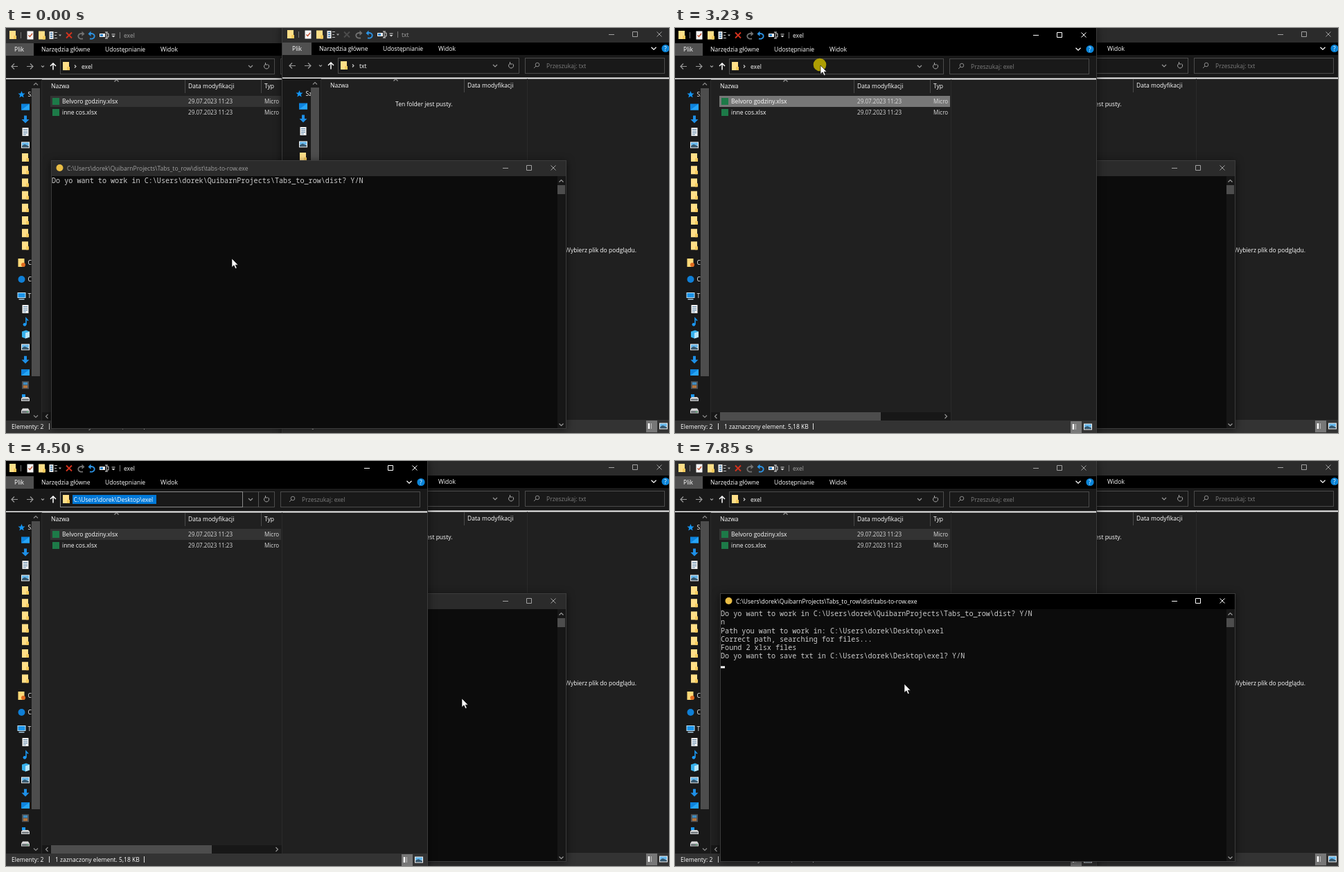
Write an HTML page that moves like this. It is 957x585 px and loops after 8 s.

```html
<!DOCTYPE html>
<html lang="pl">
<head>
<meta charset="utf-8">
<title>Konsola</title>
<style>
html, body { margin: 0; width: 100%; height: 100%; overflow: hidden; background: #202020; }
svg { display: block; width: 957px; height: 585px; }
text { font: 8.55px "Open Sans", "Noto Sans", sans-serif; fill: #fff; }
.win { --bar: #2b2b2b; --ink: #a2a2a2; }
.win.on { --bar: #000; --ink: #fff; }
.bar { fill: var(--bar); }
.ink { fill: var(--ink); }
.ctl { stroke: var(--ink); fill: none; }
.shade { filter: drop-shadow(0 2px 6px rgba(0, 0, 0, .55)); }
.num { font-size: 8.1px; fill: #dedede; }
.dim { fill: #7d7d7d; }
.mono { font: 10.13px "Noto Sans Mono", "DejaVu Sans Mono", monospace; fill: #ccc; white-space: pre; }
.row { fill: #333; }
.hot .row { fill: #777; }
.edit, .editing .crumb { display: none; }
.editing .edit { display: inline; }
</style>
</head>
<body>
<svg id="stage" viewBox="0 0 957 585"></svg>
<script>
const LOOP = 8000;
const HOME = String.raw`C:\Users\dorek`;
const PROJECT = HOME + String.raw`\QuibarnProjects\Tabs_to_row\dist`;
const FOLDER = HOME + String.raw`\Desktop\exel`;

// Markup helpers
const at = (x, y, s) => `<g transform="translate(${x} ${y})">${s}</g>`;
const rect = (x, y, w, h, fill, more = '') => `<rect x="${x}" y="${y}" width="${w}" height="${h}" fill="${fill}" ${more}/>`;
const text = (x, y, s, cls = '') => `<text x="${x}" y="${y}" class="${cls}">${s}</text>`;
const line = (d, color = '#ddd', w = 1) => `<path d="${d}" fill="none" stroke="${color}" stroke-width="${w}"/>`;
const shape = (d, fill) => `<path d="${d}" fill="${fill}"/>`;
const dot = (x, y, r, fill) => `<circle cx="${x}" cy="${y}" r="${r}" fill="${fill}"/>`;
const down = (x, y, color, s = 3) => line(`M${x - s} ${y - s / 2}l${s} ${s}l${s} ${-s}`, color, 1.2);
const up = (x, y, color, s = 3) => line(`M${x - s} ${y + s / 2}l${s} ${-s}l${s} ${s}`, color, 1.2);
const side = (x, y, dir, color, s = 3) => line(`M${x - dir * s / 2} ${y - s}l${dir * s} ${s}l${-dir * s} ${s}`, color, 1.1);

// Icons, drawn around their centre
const icon = {
  folder: rect(-5, -6, 9, 12, '#ffdf88') + shape('M1 6V1H5V6z', '#f7cb5c'),
  star: shape('M0-5L1.4-1.6L5-1.4L2.2 1L3.2 4.6L0 2.6L-3.2 4.6L-2.2 1L-5-1.4L-1.4-1.6Z', '#1496f5'),
  desktop: rect(-6, -4.5, 12, 9, '#0d83dd') + shape('M-6 4.5L6-4.5V4.5z', '#27a5f8'),
  arrow: shape('M-2-5.5h4V0H5.5L0 5.5L-5.5 0H-2z', '#1e8fe6'),
  doc: rect(-4.5, -6, 9, 12, '#f1f1f1') + line('M-3-3.5H3M-3-1H3M-3 1.5H3M-3 4H1', '#5b85a8'),
  photo: rect(-6, -4.5, 12, 9, '#f3f3f3') + rect(-5, -3.5, 10, 4, '#65b7ec') + shape('M-5 3.5V1L-1-1L5 1.5V3.5z', '#34566d'),
  badge: rect(-5, -6, 9, 12, '#ffd978') + dot(2.5, 3, 3, '#e06a20'),
  cloud: dot(0, 0, 5, '#0f7fd6'),
  pc: rect(-6, -5, 12, 8, '#bfe4fb') + rect(-5, -4, 10, 6, '#1b92e8') + rect(-4, 4, 8, 1.5, '#a9c8dc'),
  music: line('M1 4V-5L4-1.5', '#1c98f2', 1.6) + dot(-1, 4, 2.4, '#1c98f2'),
  cube: shape('M-5-4L1-6L6-4V4L0 6L-5 4z', '#36b1ec') + shape('M0-2L6-4V4L0 6z', '#b9e6fa'),
  film: rect(-5, -5.5, 10, 11, '#505458') + rect(-3, -4, 6, 3.5, '#3f8cc0') + rect(-3, .5, 6, 3.5, '#b9763a'),
  drive: shape('M-4-3H4L6 0V4H-6V0z', '#d9d9d9') + rect(-5, .5, 10, 3, '#70777c') + rect(2, 1.5, 2, 1, '#5fe07a'),
  disk: shape('M-4-1H4L6 1V5H-6V1z', '#d9d9d9') + rect(-5, 1.5, 10, 2.5, '#70777c') + rect(-5, -5, 5, 4, '#1c98f2'),
  check: rect(-4.5, -6, 9, 12, '#f5f5f5') + line('M-2.5 0L-.5 2L3-2.5', '#c6502c', 1.3),
  panel: rect(-5.5, -5.5, 6, 11, '#eee') + line('M-4-3H-1M-4 0H-1M-4 3H-1', '#3b78ad', 1.3) + line('M2-4H6M2 0H5M2 4H6', '#bbb'),
  rename: rect(-6, -2.5, 8, 5, '#f2f2f2') + rect(-5, -1.5, 4, 3, '#2f86cd') + line('M2-4.5H6M4-4.5V4.5M2 4.5H6M5-2.5H7V2.5H5'),
  turn: line('M-3 4.5C5 6 6-3-1-3H-3', 'currentColor', 1.9) + shape('M-1.5-6.5V1L-5.5-2.5z', 'currentColor')
};
const put = (name, x, y) => at(x, y, icon[name]);
const turn = (x, y, color, flip) => `<g transform="translate(${x} ${y}) scale(${flip} 1)" color="${color}">${icon.turn}</g>`;

const controls = (xs, y) => `<path class="ctl" d="M${xs[0] - 4} ${y + .5}h8M${xs[1] - 3.5} ${y - 3.5}h7v7h-7zM${xs[2] - 3.5} ${y - 3.5}l7 7m0-7l-7 7"/>`;

// x is where the scrollbar starts
function sidebar(x) {
  const small = [['desktop', 114], ['arrow', 132], ['doc', 150], ['photo', 169]];
  for (let i = 0; i < 8; i++) small.push(['folder', 187 + i * 18.2]);
  ['doc', 'music', 'cube', 'photo', 'arrow', 'desktop', 'film', 'disk', 'drive', 'drive']
    .forEach((n, i) => small.push([n, 406 + i * 18.3]));
  const heads = [['star', 96, 'Sz'], ['badge', 339, 'C'], ['cloud', 363, 'C'], ['pc', 387, 'T']];
  return rect(-2, 74, x + 16, 493, '#191919')
    + small.map(([n, y]) => put(n, 28, y)).join('')
    + heads.map(([n, y, s]) => put(n, 22.5, y) + text(31.5, y + 3, s)).join('')
    + rect(x, 74, 14, 493, '#191919') + rect(x, 87, 12, 416, '#4d4d4d')
    + up(x + 6, 81, '#8a8a8a') + down(x + 6, 561, '#8a8a8a') + rect(x + 14, 74, 1, 493, '#2b2b2b');
}

// Explorer window in local coordinates; r is its right edge
function explorer({ id, x, y, r, nav, name, count, canDelete, list }) {
  const end = r - 220;
  return `<g id="${id}" class="win" transform="translate(${x} ${y})">`
    + rect(-2.5, -3, r + 3, 600, '#202020', 'class="shade" stroke="#3c3c3c"')
    + `<rect class="bar" x="-2" y="-2" width="${r + 2}" height="24"/>`
    + put('folder', 10, 10) + rect(21, 6, 1, 9, '#777') + put('check', 35, 10.5) + put('folder', 52, 10.5)
    + put('panel', 68, 10.5) + shape('M76 9.5h4l-2 2.5z', '#aaa')
    + line('M87 6.5l8 8m0-8l-8 8', canDelete ? '#d3321d' : '#4c4c4c', 1.9)
    + turn(108, 11, '#727272', -1) + turn(124, 11, '#2c94e6', 1) + put('rename', 141, 10.5)
    + line('M152.5 9h5') + shape('M152.5 11h5l-2.5 2.5z', '#ddd') + rect(164, 6, 1, 9, '#777')
    + text(170, 13.5, name, 'ink') + controls([r - 87, r - 53, r - 18], 10)
    + rect(-2, 22, r + 2, 18, '#000') + rect(-2, 22, 42, 18, '#505050')
    + [[12, 'Plik'], [51, 'Narzędzia główne'], [143, 'Udostępnianie'], [223, 'Widok']].map(([tx, s]) => text(tx, 34, s)).join('')
    + down(r - 26, 30.5, '#fff', 3.5) + dot(r - 9, 30.5, 5.6, '#0a84d8') + text(r - 11, 33.6, '?')
    + rect(-2, 40, r + 2, 33, '#191919')
    + line('M17 55.5H8M12 51.5l-4 4l4 4', '#9a9a9a', 1.2) + line('M30 55.5h9M35 51.5l4 4l-4 4', '#9a9a9a', 1.2)
    + down(53, 55.5, '#999', 2) + line('M68 60.5V51M64 55l4-4l4 4', '#fff', 1.5)
    + rect(78.5, 44.5, end - 79, 22, '#191919', 'stroke="#4b4b4b"')
    + put('folder', 87, 55)
    + `<g class="crumb">${side(100, 55.5, 1, '#ccc', 2)}${text(109, 58.5, name)}</g>`
    + `<g class="edit">${rect(78.5, 44.5, 263, 22, 'none', 'stroke="#8a8a8a"')}${rect(364, 44, 1, 23, '#555')}${rect(96, 49, 121, 13, '#0078d7')}${text(97.5, 58.6, FOLDER)}</g>`
    + down(end - 35, 55.5, '#999') + line(`M${end - 10} 52.5a3.5 3.5 0 1 1-3.5-.2M${end - 13.5} 50v3h3`, '#aaa')
    + rect(r - 211.5, 44.5, 201, 22, '#191919', 'stroke="#4b4b4b"')
    + `<circle cx="${r - 194}" cy="54" r="2.8" fill="none" stroke="#8a8a8a"/>` + line(`M${r - 196} 56l-3 3`, '#8a8a8a')
    + text(r - 181, 58.5, 'Przeszukaj: ' + name, 'dim')
    + rect(-2, 72.5, r + 2, 2, '#f2f2f2')
    + sidebar(nav) + list
    + rect(-2, 567, r + 2, 30, '#333') + text(8, 579.3, 'Elementy: ' + count)
    + rect(62, 571, 1, 9, '#ddd')
    + (count ? text(71, 579.3, '1 zaznaczony element. 5,18 KB') + rect(199, 571, 1, 9, '#ddd') : '')
    + rect(r - 37, 568, 16, 17, '#777') + line(`M${r - 33} 572v8`, '#fff', 2.5) + line(`M${r - 29.5} 572v8`, '#bbb')
    + put('photo', r - 12, 576) + '</g>';
}

const column = (x, s) => rect(x, 75, 1, 19, '#4a4a4a') + text(x + 5, 87.3, s);
const sheet = (y, name) => rect(67, y - 5, 10, 10, '#1d7a48') + text(81, y + 3, name)
  + text(263, y + 3, '29.07.2023 11:23', 'num') + text(373, y + 3, 'Micro', 'num');

const files = text(65, 87.3, 'Nazwa') + up(159.5, 76, '#999')
  + column(258, 'Data modyfikacji') + column(368, 'Typ')
  + '<rect class="row" x="64" y="98" width="333" height="16"/>'
  + sheet(106, 'Belvoro godziny.xlsx') + sheet(122, 'inne cos.xlsx')
  + rect(398, 74, 1, 493, '#2b2b2b')
  + rect(52, 555, 346, 12, '#171717') + rect(65, 555, 232, 12, '#4d4d4d')
  + side(59, 561, -1, '#999') + side(391, 561, 1, '#999');

const empty = text(67, 87.3, 'Nazwa') + up(161.5, 76, '#999') + column(260, 'Data modyfikacji')
  + text(161, 114, 'Ten folder jest pusty.') + rect(351, 74, 1, 493, '#2b2b2b')
  + '<text x="509" y="324.5" text-anchor="end">Wybierz plik do podglądu.</text>';

// Console geometry
const CELL = 6.08, PITCH = 12.16, LEFT = 66;
const prompt = 'Path you want to work in: ';
const output = [
  [0, 0, `Do yo want to work in ${PROJECT}? Y/N`],
  [1700, 1, 'n'],
  [1880, 2, prompt],
  [6100, 2, prompt + FOLDER],
  [7290, 3, 'Correct path, searching for files...'],
  [7330, 4, 'Found 2 xlsx files'],
  [7330, 5, `Do yo want to save txt in ${FOLDER}? Y/N`]
];
// time, column, row; a missing column hides the caret
const caretSteps = [
  [0], [130, 0, 1], [620], [1140, 0, 1], [1700, 1, 1], [1880, 26, 2], [2400],
  [4640, 26, 2], [5580], [6100, 53, 2], [6620], [7140, 53, 2], [7290, 0, 6]
];
const path = [
  [0, 326, 333], [850, 326, 333], [960, 357, 328], [2360, 357, 328], [2560, 190, 200],
  [2720, 52, 95], [2900, 130, 41], [3100, 210, 54], [3860, 210, 54], [4430, 671, 348],
  [4600, 641, 336], [4700, 641, 336], [5220, 153, 290], [5430, 150, 288], [5530, 150, 288],
  [5850, 300, 345], [6310, 322, 315], [6370, 322, 315], [6450, 324, 317], [7530, 324, 317],
  [7570, 331, 322], [LOOP, 331, 322]
];
const clicks = [[70, 130], [3230, 3300], [4600, 4670]];

const terminal = '<g id="console" class="win">'
  + rect(65.5, 191.5, 743, 387, '#0c0c0c', 'class="shade" stroke="#3c3c3c"')
  + '<rect class="bar" x="66" y="192" width="742" height="22"/>'
  + dot(77.5, 202, 5, '#e9bd45')
  + text(88, 205.5, PROJECT + '\\tabs-to-row.exe', 'ink')
  + controls([721, 755, 790], 202)
  + rect(796, 214, 12, 364, '#171717') + rect(796, 227, 11, 13, '#4d4d4d')
  + up(801.5, 221, '#999') + down(801.5, 573, '#999')
  + [0, 1, 2, 3, 4, 5].map(i => text(LEFT, 224.2 + i * PITCH, '', 'mono line')).join('')
  + '<rect id="caret" width="6" height="3" fill="#f2f2f2"/></g>';

const stage = document.getElementById('stage');
stage.innerHTML = '<g id="desk">'
  + explorer({ id: 'left', x: 0, y: 0, r: 608, nav: 37, name: 'exel', count: 2, canDelete: true, list: files })
  + explorer({ id: 'right', x: 401, y: -1, r: 560, nav: 39, name: 'txt', count: 0, canDelete: false, list: empty })
  + terminal + '</g>'
  + '<g id="pointer"><circle id="halo" cx="-1" cy="-1" r="9.3" fill="#c2b000" opacity=".88"/>'
  + '<path d="M0 0V12.5L3 9.8L5.2 14.6L7.2 13.7L5.2 9.2H9Z" fill="#fff" stroke="#000" stroke-width=".6"/></g>';

const $ = id => document.getElementById(id);
const [desk, left, right, shell, caret, pointer, halo] = ['desk', 'left', 'right', 'console', 'caret', 'pointer', 'halo'].map($);
const rows = [...document.querySelectorAll('.line')];
let order = '';

function stack(key, wins) {
  if (key === order) return;
  order = key;
  desk.append(...wins);
}

function position(t) {
  const i = path.findIndex(p => p[0] > t);
  const [t0, x0, y0] = path[i - 1], [t1, x1, y1] = path[i];
  const k = (t - t0) / (t1 - t0);
  return [x0 + (x1 - x0) * k, y0 + (y1 - y0) * k].map(Math.round);
}

function render(t) {
  const leftOn = t >= 3230 && t < 4600;
  if (t < 3230) stack('start', [left, right, shell]);
  else if (leftOn) stack('left', [right, shell, left]);
  else stack('console', [right, left, shell]);

  left.classList.toggle('on', leftOn);
  left.classList.toggle('hot', leftOn && t < 3300);
  left.classList.toggle('editing', leftOn && t >= 3300);
  shell.classList.toggle('on', t >= 70 && !leftOn);

  rows.forEach((row, i) => {
    const shown = output.filter(o => o[1] === i && o[0] <= t).pop();
    row.textContent = shown ? shown[2] : '';
  });

  const [, col, line] = caretSteps.filter(c => c[0] <= t).pop();
  caret.style.display = col === undefined ? 'none' : '';
  if (col !== undefined) {
    caret.setAttribute('x', LEFT + col * CELL);
    caret.setAttribute('y', 235.5 + (line - 1) * PITCH);
  }

  pointer.setAttribute('transform', `translate(${position(t)})`);
  halo.style.display = clicks.some(([a, b]) => t >= a && t < b) ? '' : 'none';
}

function tick() {
  render(performance.now() % LOOP);
  requestAnimationFrame(tick);
}
tick();
</script>
</body>
</html>
```
